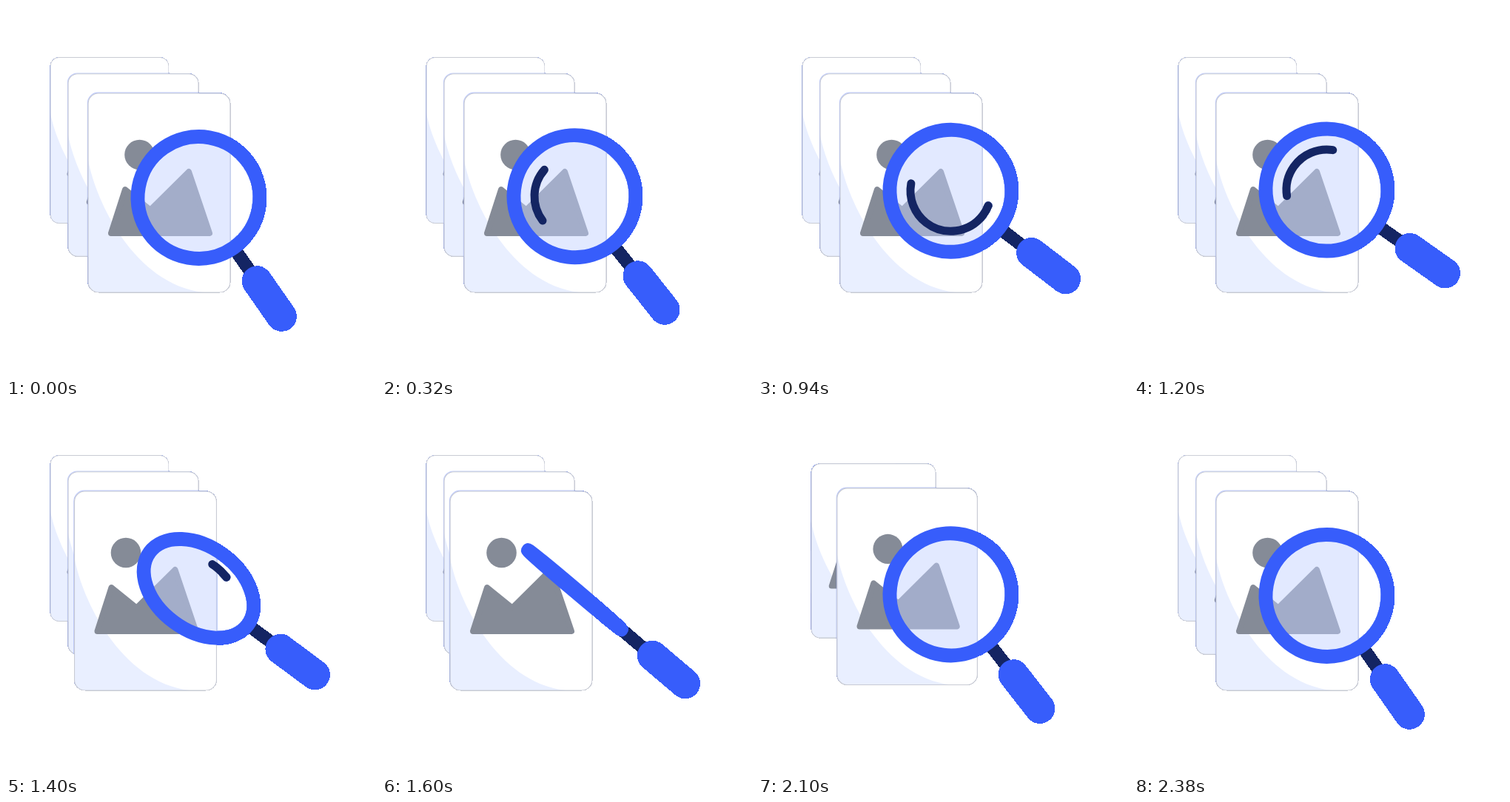
Animation, 500 px wide and 500 px high, one loop 2.4 s. Source, as an HTML page:

```html
<!DOCTYPE html>
<html lang="en">
<head>
<meta charset="utf-8">
<title>Image search</title>
<style>
  html, body { margin: 0; height: 100%; overflow: hidden; background: #fff; }
  svg { display: block; width: 100vw; height: 100vh; }
</style>
</head>
<body>
<svg viewBox="0 0 500 500">
  <defs>
    <!-- Hard alpha edge: anything less than half opaque disappears -->
    <filter id="cutout" filterUnits="userSpaceOnUse" x="0" y="0" width="500" height="500" color-interpolation-filters="sRGB">
      <feComponentTransfer><feFuncA type="discrete" tableValues="0 1"/></feComponentTransfer>
    </filter>
    <clipPath id="cardShape"><rect width="192" height="269" rx="14"/></clipPath>
    <g id="card">
      <rect x="-.6" y="-.8" width="192" height="269" rx="14" fill="none" stroke="#375dfb" stroke-opacity=".35" stroke-width="1.2"/>
      <rect width="192" height="269" rx="14" fill="#fff"/>
      <path d="M0 90C10 145 62 258 156 269H0Z" fill="#e9efff" clip-path="url(#cardShape)"/>
      <rect width="192" height="269" rx="14" fill="none" stroke="#c8cbd4" stroke-width="1.2"/>
      <g fill="#858b97">
        <circle cx="69.5" cy="83" r="20.3"/>
        <path d="M31 189L50 130L84 157.5L136 106L164 189Z" stroke="#858b97" stroke-width="8" stroke-linejoin="round"/>
      </g>
    </g>
  </defs>
  <g filter="url(#cutout)">
    <use class="card" href="#card"/>
    <use class="card" href="#card"/>
    <use class="card" href="#card"/>
    <use class="card" href="#card"/>
    <g id="glass" fill="none">
      <path d="M85 0H125" stroke="#142563" stroke-width="17.5"/>
      <path d="M137.5 0H195.5" stroke="#375dfb" stroke-width="41" stroke-linecap="round"/>
      <ellipse id="lens" rx="82.5" fill="#c2d2ff" fill-opacity=".48"/>
      <ellipse id="glint" rx="54.5" pathLength="360" stroke="#142563" stroke-width="11" stroke-linecap="round"/>
      <ellipse id="ring" rx="82.5" stroke="#375dfb" stroke-width="19"/>
    </g>
  </g>
</svg>
<script>
const LOOP = 2400;
// Stack positions from the farthest to the nearest: x, y, scale
const SLOTS = [[36, 47, 0.75], [60, 69.5, 0.833], [84, 91.7, 0.917], [111, 118, 1]];
const cards = document.querySelectorAll('.card');
const [glass, lens, glint, ring] = ['glass', 'lens', 'glint', 'ring'].map(id => document.getElementById(id));

const ease = (t, from, to) => {
  const p = Math.min(1, Math.max(0, (t - from) / (to - from)));
  return p * p * (3 - 2 * p);
};
const set = (el, attrs) => {
  for (const name in attrs) el.setAttribute(name, attrs[name]);
};
const place = (card, [x, y, scale], opacity) =>
  set(card, { transform: `translate(${x} ${y}) scale(${scale})`, opacity });

function drawCards(t) {
  for (let i = 0; i < 3; i++) {
    const start = 2000 - i * 100;
    const p = ease(t, start, start + 400);
    const pos = SLOTS[i].map((v, j) => v + (SLOTS[i + 1][j] - v) * p);
    place(cards[i], pos, i ? 1 : p);
  }
  const [x, y, scale] = SLOTS[3];
  const shift = 233 * ease(t, 1530, 2130) - 28 * ease(t, 1200, 1530);
  place(cards[3], [x + shift, y, scale], 1 - ease(t, 1650, 2050));
}

function drawGlass(t) {
  const swing = ease(t, 0, 1200) - ease(t, 1200, LOOP);
  const angle = 55.1 - 20 * swing;
  const flip = Math.max(0.018, Math.abs(1 - 2 * ease(t, 1200, 2000)));
  set(glass, { transform: `translate(260.5 ${259 - 10.5 * swing}) rotate(${angle})` });
  set(lens, { ry: 82.5 * flip });
  set(ring, { ry: 82.5 * flip });

  const life = (t - 125) / 1355;
  const visible = life > 0 && life < 1;
  const length = visible ? 178 * Math.sin(Math.PI * life) : 0;
  const start = (35 + 0.458 * t - length / 2 - angle + 720) % 360;
  set(glint, {
    ry: 54.5 * flip,
    visibility: visible ? 'visible' : 'hidden',
    'stroke-dasharray': `${length} ${360 - length}`,
    'stroke-dashoffset': -start
  });
}

function frame() {
  const t = performance.now() % LOOP;
  drawCards(t);
  drawGlass(t);
  requestAnimationFrame(frame);
}
frame();
</script>
</body>
</html>
```
